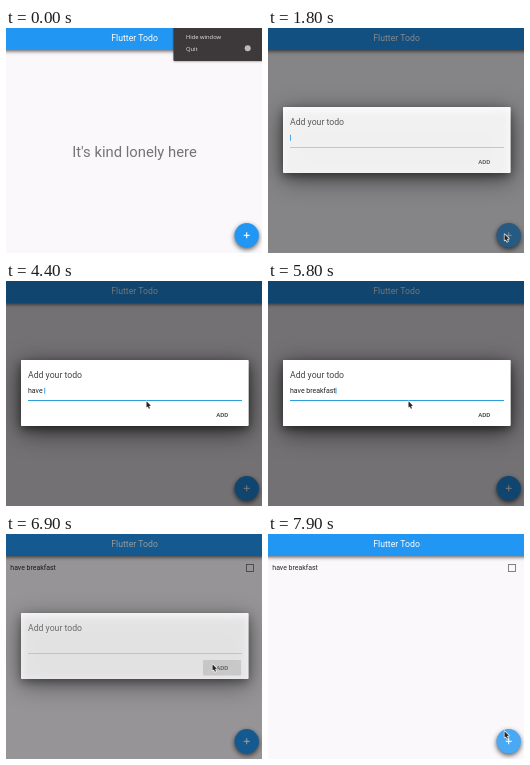
An HTML page with a canvas for the animation above (8 s loop, 256 by 225 pixels).

```html
<!DOCTYPE html>
<html lang="en">
<head>
<meta charset="utf-8">
<title>Todo app</title>
<style>
  html, body { margin: 0; width: 100%; height: 100%; overflow: hidden; background: #fbf8fc; }
  canvas { display: block; width: 100vw; height: 100vh; }
</style>
</head>
<body>
<canvas id="stage"></canvas>
<script>
const W = 256, H = 225, LOOP = 8000, STEP = 100;
const BLUE = '#2196f3';
const canvas = document.getElementById('stage');
const ctx = canvas.getContext('2d');

// [time, x, y] of the pointer tip
const pointerPath = [
  [100, 205, 20], [300, 160, 76], [650, 160, 76], [800, 188, 130], [1000, 218, 185],
  [1500, 236, 206], [2350, 236, 206], [2600, 140, 120], [6150, 140, 120],
  [6500, 206, 130], [7200, 206, 130], [7600, 231, 190], [7900, 236, 197]
];
// [time, typed text]
const typing = [
  [3500, 'h'], [3900, 'hav'], [4100, 'have'], [4400, 'have '], [4700, 'have br'],
  [4900, 'have brea'], [5300, 'have break'], [5500, 'have breakf'],
  [5600, 'have breakfa'], [5700, 'have breakfas'], [5800, 'have breakfast']
];

const clamp = v => Math.max(0, Math.min(1, v));
const ramp = (t, a, b) => clamp((t - a) / (b - a));
const easeOut = p => 1 - (1 - p) ** 3;

function pathAt(path, t) {
  let i = 1;
  while (i < path.length - 1 && path[i][0] < t) i++;
  const [t0, x0, y0] = path[i - 1], [t1, x1, y1] = path[i];
  const p = ramp(t, t0, t1);
  return [x0 + (x1 - x0) * p, y0 + (y1 - y0) * p];
}

function text(str, x, y, size, color, { weight = 400, align = 'left', family = 'Roboto' } = {}) {
  ctx.font = `${weight} ${size}px ${family}, sans-serif`;
  ctx.textAlign = align;
  ctx.fillStyle = color;
  ctx.fillText(str, x, y);
}

function rect(x, y, w, h, color, r = 0) {
  ctx.fillStyle = color;
  ctx.beginPath();
  ctx.roundRect(x, y, w, h, r);
  ctx.fill();
}

function disc(x, y, r, color) {
  ctx.fillStyle = color;
  ctx.beginPath();
  ctx.arc(x, y, r, 0, 7);
  ctx.fill();
}

// Draws with a shadow that keeps its size at any pixel ratio
function shadowed(blur, dy, alpha, draw) {
  const k = canvas.width / W;
  ctx.save();
  ctx.shadowColor = `rgba(0,0,0,${alpha})`;
  ctx.shadowBlur = blur * k;
  ctx.shadowOffsetY = dy * k;
  draw();
  ctx.restore();
}

function drawPage(t) {
  rect(0, 0, W, H, '#fbf8fc');
  if (t < 6800) {
    text("It's kind lonely here", 128.5, 129, 14.8, '#757376', { align: 'center' });
  } else {
    text('have breakfast', 4.3, 36.2, 6.96, '#2a292a');
    ctx.strokeStyle = '#757376';
    ctx.lineWidth = 0.9;
    ctx.strokeRect(240.5, 30.5, 7, 7);
  }
  shadowed(4, 1.4, 0.7, () => rect(-8, -8, W + 16, 30, BLUE));
  text('Flutter Todo', 128.6, 12.6, 8.7, '#fff', { align: 'center' });

  shadowed(5, 2, 0.65, () => disc(240.7, 207.3, 12.2, BLUE));
  const glow = t >= 7600 ? 0.18 : 0.18 * ramp(t, 1400, 1500) * (1 - ramp(t, 1800, 2400));
  disc(240.7, 207.3, 12.2, `rgba(255,255,255,${glow})`);
  rect(237.7, 206.8, 6, 1.1, '#fff');
  rect(240.15, 204.3, 1.1, 6, '#fff');
}

function drawDialog(t, shown) {
  rect(0, 0, W, H, `rgba(0,0,0,${0.54 * shown})`);

  ctx.save();
  ctx.globalAlpha = shown;
  shadowed(24, 6, 0.6, () => rect(15, 79, 227.5, 66, '#fff', 1));
  shadowed(9, 3, 0.45, () => rect(15, 79, 227.5, 66, '#fff', 1));
  text('Add your todo', 22, 97, 8.7, '#454345');

  const closing = t >= 6800;
  let typed = '', last = 1800;
  for (const [at, str] of typing) {
    if (t >= at && !closing) [last, typed] = [at, str];
  }
  text(typed, 22, 112, 6.96, '#222');

  const focused = t >= 2000 && !closing;
  if (focused) rect(22, 119, 214, 1.1, '#2b9fd9');
  else rect(22, 119.2, 214, 0.6, '#8f8f8f');

  const blinkOn = Math.floor((t - last) / 500) % 2 === 0;
  if (t >= 1700 && !closing && blinkOn) {
    const x = 22 + ctx.measureText(typed).width;
    rect(x, 106.8, 0.9, 6, BLUE);
  }

  if (closing) rect(197, 126, 38, 15.5, 'rgba(0,0,0,.16)', 1);
  text('ADD', 216.2, 136, 6.1, '#333', { weight: 500, align: 'center' });
  ctx.restore();
}

function drawMenu(alpha) {
  ctx.save();
  ctx.globalAlpha = alpha;
  shadowed(2, 0.5, 0.4, () => rect(167.5, -4, 92, 37, '#3d393b', 1));
  const label = { family: '"Open Sans"' };
  text('Hide window', 180, 11.2, 5.8, '#e6e3e4', label);
  text('Quit', 180, 22.6, 5.8, '#e6e3e4', label);
  disc(241.7, 20.2, 3, '#bdb9bb');
  ctx.restore();
}

function drawPointer(x, y) {
  ctx.save();
  ctx.translate(x, y);
  ctx.beginPath();
  ctx.moveTo(0.5, 0.3);
  for (const [px, py] of [[0.5, 6.6], [1.9, 5.4], [2.9, 7.8], [4, 7.3], [3, 5], [4.9, 4.8]]) {
    ctx.lineTo(px, py);
  }
  ctx.closePath();
  ctx.lineJoin = 'round';
  ctx.strokeStyle = '#fff';
  ctx.lineWidth = 1.3;
  ctx.stroke();
  ctx.fillStyle = '#262426';
  ctx.fill();
  ctx.restore();
}

function resize() {
  const ratio = window.devicePixelRatio || 1;
  const w = Math.round(innerWidth * ratio), h = Math.round(innerHeight * ratio);
  if (canvas.width !== w || canvas.height !== h) {
    canvas.width = w;
    canvas.height = h;
  }
  ctx.setTransform(w / W, 0, 0, h / H, 0, 0);
}

function draw(t) {
  resize();
  drawPage(t);
  const shown = easeOut(ramp(t, 1550, 2050)) * (1 - ramp(t, 6800, 7200));
  if (shown > 0) drawDialog(t, shown);
  const menu = 1 - ramp(t, 0, 300);
  if (menu > 0) drawMenu(menu);
  if (t >= 200) drawPointer(...pathAt(pointerPath, t));
}

const start = performance.now();
function frame() {
  const t = (performance.now() - start) % LOOP;
  draw(Math.floor(t / STEP) * STEP);
  requestAnimationFrame(frame);
}
frame();
</script>
</body>
</html>
```
